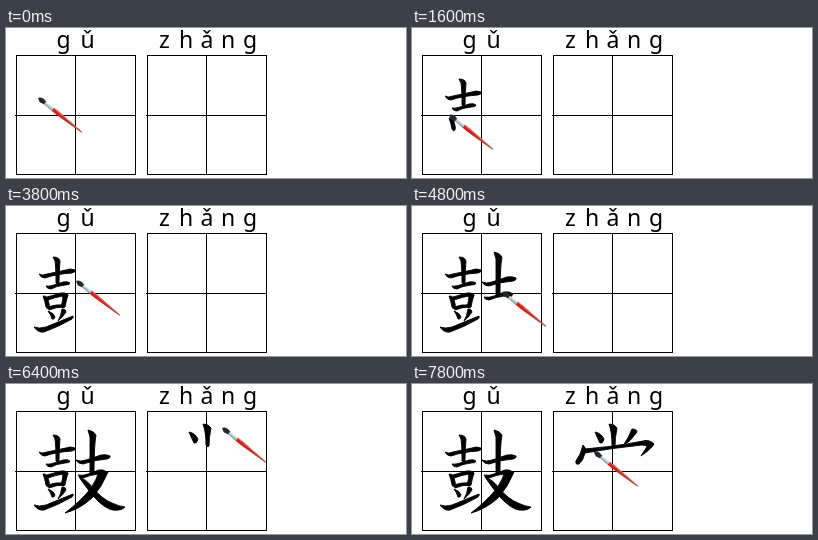
These frames come from a looping animation (400x150 px, 8000 ms). An HTML page:

```html
<!DOCTYPE html>
<html lang="zh">
<head>
<meta charset="utf-8">
<title>Stroke order</title>
<style>
  html, body { margin: 0; width: 100%; height: 100%; overflow: hidden; background: #fff; }
  svg { display: block; width: 400px; height: 150px; }
  text { font: 23px "Noto Sans", "Open Sans", sans-serif; text-anchor: middle; }
  .grid { fill: none; stroke: #000; shape-rendering: crispEdges; }
  #ink { stroke: #000; stroke-width: .9; stroke-linejoin: round; }
</style>
</head>
<body>
<svg viewBox="0 0 400 150">
  <defs>
    <linearGradient id="metal" x1="0" y1="0" x2="0" y2="1">
      <stop offset="0" stop-color="#e8f0f2"/>
      <stop offset=".5" stop-color="#b8ccd4"/>
      <stop offset="1" stop-color="#74868e"/>
    </linearGradient>
    <linearGradient id="wood">
      <stop offset="0" stop-color="#d81c14"/>
      <stop offset=".6" stop-color="#c03028"/>
      <stop offset="1" stop-color="#a06050"/>
    </linearGradient>
  </defs>
  <text x="57.5 81.5" y="20">gǔ</text>
  <text x="158.5 180 201 222 244" y="20">zhǎng</text>
  <path class="grid" d="M10.5 27.5h119v119h-119zM69.5 27.5v119M9 87.5h120.5"/>
  <path class="grid" d="M141.5 27.5h119v119h-119zM200.5 27.5v119M140 87.5h120.5"/>
  <path id="ink"/>
  <g id="brush">
    <path fill="#24282c" d="M-1-1Q2-2.5 5 0L7.5 3L5 5.5Q3 4 1 3.5Q0 2-1-1Z"/>
    <g transform="translate(6 4) rotate(38.5)">
      <path fill="url(#metal)" d="M0-1.6L10-2V2L0 1.6Z"/>
      <path fill="url(#wood)" d="M10-2Q16-2.3 23-1.7L47-.5V.5L23 1.7Q16 2.3 10 2Z"/>
      <path fill="none" stroke="#f09488" stroke-width=".7" d="M11-1.4L40-.7"/>
    </g>
  </g>
</svg>
<script>
const STEP = 200;

// Each pose: brush tip x, y and the ink laid down on arriving there.
const drum = [
  [33, 71],
  [66, 65, "M33 68Q36 70 41 68L60 64Q64 62 69 64Q70 66 66 67Q50 68 39 72Q35 72 33 68Z"],
  [49, 53],
  [52, 76, "M47 51Q53 51 54 55Q53 66 53 77Q51 79 50 77Q50 62 49 55Z"],
  [41, 80],
  [62, 77, "M40 80Q44 81 57 76Q62 75 64 77Q64 79 59 79Q50 80 45 83Q41 83 40 80Z"],
  [38, 88],
  [42, 100, "M37 90Q42 90 42 94Q44 99 43 102Q41 104 40 101Q39 95 37 90Z"],
  [38, 88],
  [61, 88, "M41 91L55 87Q59 86 62 89Q62 91 60 92L57 90Q50 91 42 94Z"],
  [57, 100, "M57 88L62 89Q60 95 59 101Q57 103 55 101Q57 95 57 88Z"],
  [42, 100],
  [57, 99, "M42 101Q50 98 58 99L58 101Q50 101 43 104Z"],
  [43, 106],
  [47, 112, "M42 105Q48 107 49 111Q48 114 46 113Q45 109 42 105Z"],
  [57, 100],
  [52, 113, "M56 103Q60 103 60 106Q57 111 52 115Q55 110 56 103Z"],
  [31, 122],
  [65, 111, "M28 121Q33 123 40 121Q52 116 67 110Q68 111 66 113Q52 121 38 126Q32 127 28 121Z"]
];
const branch = [
  [71, 76],
  [100, 72, "M70 76Q74 78 80 76L95 71Q100 70 104 72Q105 74 101 75Q88 76 77 80Q72 80 70 76Z"],
  [85, 49],
  [86, 89, "M82 46Q88 47 90 51Q88 62 88 89L84 90Q84 62 84 53Z"],
  [73, 91],
  [91, 87, "M72 91Q77 92 82 90L93 86Q97 85 101 88L98 92Q95 89 92 90Q84 91 77 94Q73 94 72 91Z"],
  [61, 127, "M93 87L102 88Q96 103 86 114Q74 125 59 129Q76 116 85 104Q91 95 93 87Z"],
  [75, 93],
  [117, 122, "M73 93Q80 95 87 104Q96 115 106 119Q112 122 119 123Q115 127 107 126Q99 125 88 113Q79 102 73 93Z"]
];
const palm = [
  [199, 42],
  [199, 58, "M197 40Q203 40 205 44Q203 54 203 62Q201 64 200 61Q200 48 197 40Z"],
  [184, 48],
  [188, 55, "M183 48Q189 49 192 55Q191 60 188 59Q185 53 183 48Z"],
  [217, 45],
  [211, 58, "M220 45Q225 45 225 48Q219 57 211 62Q217 53 220 45Z"],
  [171, 63],
  [167, 79, "M171 61Q175 64 173 69Q171 77 167 80Q163 81 164 77Q169 70 171 61Z"],
  [168, 68],
  [233, 59, "M173 65Q195 63 215 60L231 57Q237 55 242 60L239 64Q236 61 230 61Q200 64 173 69Z"],
  [231, 71, "M237 58L242 60Q237 67 229 72Q234 65 237 58Z"],
  [183, 69]
];

const poses = [...drum, ...branch, ...palm];
const ink = document.getElementById("ink");
const brush = document.getElementById("brush");
const start = performance.now();
let shown = -1;

function draw(step) {
  const [x, y] = poses[step];
  ink.setAttribute("d", poses.slice(0, step + 1).map(p => p[2] || "").join(""));
  brush.setAttribute("transform", `translate(${x} ${y})`);
}

function tick() {
  const step = Math.floor((performance.now() - start) / STEP) % poses.length;
  if (step !== shown) draw(shown = step);
  requestAnimationFrame(tick);
}
tick();
</script>
</body>
</html>
```
